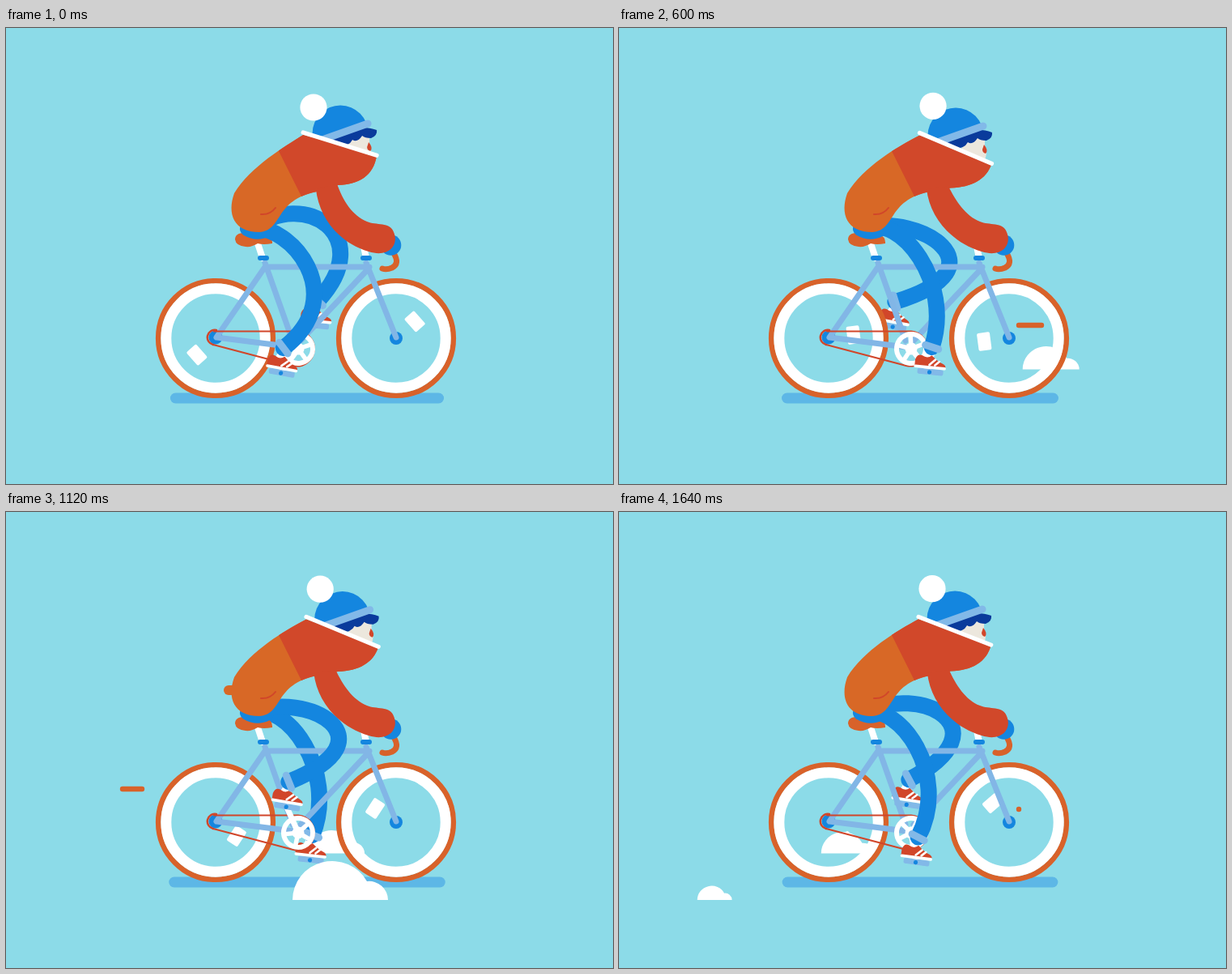
Recreate the animation shown at these times as an HTML page. Size 750 px wide and 563 px high, loop 1680 ms.

```html
<!DOCTYPE html>
<html lang="en">
<head>
<meta charset="utf-8">
<title>Winter ride</title>
<style>
html, body { margin: 0; width: 100%; height: 100%; overflow: hidden; background: #8cdbe8; }
svg { display: block; width: 100vw; height: 100vh; }
.line { fill: none; stroke-linecap: round; stroke-linejoin: round; }
</style>
</head>
<body>
<svg id="stage" viewBox="0 0 750 563" preserveAspectRatio="none">
  <defs>
    <clipPath id="chest"><path d="M322 122L372 222H490V100H322Z"/></clipPath>
    <g id="shoe">
      <rect x="-15" y="-3" width="32" height="7" rx="2" fill="#82b9e8"/>
      <circle r="2.6" cy="1" fill="#1486df"/>
      <path d="M-4 -17L1 -27" class="line" stroke="#fff" stroke-width="12"/>
      <path d="M-19 -6V-13Q-17 -21 -11 -19Q-4 -15 1 -20Q9 -13 15 -11Q20 -9 19 -6Z" fill="#d1462a"/>
      <path d="M-18 -5H18" class="line" stroke="#fff" stroke-width="3.6"/>
      <path d="M-1 -8L6 -15M6 -8L11 -13" class="line" stroke="#fff" stroke-width="2.6"/>
    </g>
    <g id="wheel">
      <circle r="70.8" fill="none" stroke="#d8622a" stroke-width="6.6"/>
      <circle r="61.2" fill="none" stroke="#fff" stroke-width="13"/>
    </g>
    <path id="cloud" d="M-59 0A49 48 0 0 1 33 -23A23.2 23.2 0 0 1 59 0Z" fill="#fff"/>
    <path id="reflector" d="M-8 -9Q-8 -11 -6 -11H6Q8 -11 8 -9V9Q8 11 6 11H-6Q-8 11 -8 9Z" fill="#fff"/>
  </defs>
  <rect width="750" height="563" fill="#8cdbe8"/>
  <path id="shadow" class="line" stroke="#5db7e6" stroke-width="13"/>
  <use id="farCloud" href="#cloud"/>
  <g id="streaks"></g>
  <g id="farLeg"></g>

  <use href="#wheel" x="259" y="383"/>
  <use href="#wheel" x="482" y="383"/>
  <use id="backRef" href="#reflector"/>
  <use id="frontRef" href="#reflector"/>

  <g class="line">
    <path d="M311 266L317 284M442 270L445 284" stroke="#fff" stroke-width="8"/>
    <circle cx="259" cy="382" r="8.5" fill="#1486df"/>
    <path d="M260 373A9 9 0 0 0 256 391" stroke="#d1462a" stroke-width="2.5"/>
    <circle cx="482" cy="383" r="8" fill="#1486df"/>
    <path d="M320 290L354 386M322 295H449M448 297L364 386M320 295L260 382L355 394M445 290L482 382" stroke="#82b6e6" stroke-width="7"/>
    <path d="M314 284H322M441 284H449" stroke="#1486df" stroke-width="6"/>
    <path d="M479 278Q487 291 477 296Q470 299 465 297" stroke="#d8622a" stroke-width="7"/>
    <path d="M257 374.5H361A21.5 21.5 0 1 1 355 417L256 391" stroke="#d1462a" stroke-width="2.2"/>
  </g>
  <g id="ring">
    <circle r="18" fill="none" stroke="#fff" stroke-width="6"/>
    <circle r="7.5" fill="#fff"/>
    <path id="spokes" stroke="#fff" stroke-width="5.5"/>
  </g>
  <path id="crank" class="line" stroke="#fff" stroke-width="7"/>
  <path d="M283 261Q283 254 292 253H318Q330 257 329 266Q318 268 311 266Q303 271 296 270Q284 269 283 261Z" fill="#d8622a"/>
  <path d="M298 248Q310 255 322 249" class="line" stroke="#1486df" stroke-width="18"/>
  <g id="nearLeg"></g>

  <g id="head">
    <path d="M422 130H449L449 142Q453 150 449 160L420 152Z" fill="#ece7dd"/>
    <path d="M448 141Q454 148 450 152Q446 151 446 147Z" fill="#d1462a"/>
    <path d="M394 142L428 124Q445 121 458 126Q459 133 451 136Q443 136 440 133Q434 142 428 138Q424 146 411 146Z" fill="#0a3b9c"/>
    <path d="M381 143A33.5 33.5 0 1 1 445 117Z" fill="#1486df"/>
    <path d="M382 141L447 118" class="line" stroke="#82b9e8" stroke-width="9"/>
  </g>
  <circle id="pom" r="16.6" fill="#fff"/>
  <path id="nub" class="line" stroke="#d86826" stroke-width="12"/>
  <path id="torso" fill="#d86826"/>
  <path id="torsoFront" fill="#d1482a" clip-path="url(#chest)"/>
  <path d="M315 230Q326 231 333 222" class="line" stroke="#d1462a" stroke-width="2"/>
  <circle cx="475.5" cy="268" r="12.8" fill="#1486df"/>
  <path id="sleeve" fill="#d1482a"/>
  <path id="collar" class="line" stroke="#fff" stroke-width="5.2"/>
  <use id="nearCloud" href="#cloud"/>
</svg>
<script>
const LOOP = 1680, STEP = 40;
const HUB = { x: 361, y: 396 }, CRANK = 36;
const HIP = { x: 305, y: 248 }, THIGH = 93;
const NS = 'http://www.w3.org/2000/svg';
const $ = id => document.getElementById(id);
const rad = deg => deg * Math.PI / 180;
const clamp = v => Math.max(0, Math.min(1, v));
const set = (el, attrs) => { for (const k in attrs) el.setAttribute(k, attrs[k]); };

function add(parent, tag, attrs) {
  const el = document.createElementNS(NS, tag);
  set(el, attrs);
  parent.appendChild(el);
  return el;
}

const line = (parent, stroke, width) =>
  add(parent, 'path', { class: 'line', stroke, 'stroke-width': width });

function makeLeg(group) {
  return {
    shoe: add(group, 'use', { href: '#shoe' }),
    limb: line(group, '#1486df', 20),
    cuff: line(group, '#82b9e8', 9)
  };
}

const near = makeLeg($('nearLeg')), far = makeLeg($('farLeg'));

// start x, end x, y, first step, colour
const streaks = [
  [192, 144, 342, 4, '#d8622a'],
  [545, 485, 405, 9, '#fff'],
  [550, 494, 367, 15, '#d8622a']
].map(([x0, x1, y, start, color]) =>
  ({ x0, x1, y, start, el: line($('streaks'), color, 6.4) }));

let spokes = '';
for (let i = 0; i < 5; i++) {
  const a = rad(72 * i);
  spokes += `M0 0L${18 * Math.cos(a)} ${18 * Math.sin(a)}`;
}
set($('spokes'), { d: spokes });

function pedalAt(deg) {
  return { x: HUB.x + CRANK * Math.cos(rad(deg)), y: HUB.y + CRANK * Math.sin(rad(deg)) };
}

// A limb of fixed length bows out from the line between hip and ankle.
function poseLeg(leg, deg) {
  const p = pedalAt(deg);
  const x = p.x + 3, y = p.y - 30;
  const dist = Math.hypot(x - HIP.x, y - HIP.y);
  const ux = (x - HIP.x) / dist, uy = (y - HIP.y) / dist;
  const bow = Math.sqrt(THIGH * THIGH - dist * dist / 4);
  const upper = bow * (1 + 0.007 * (x - 368)), lower = bow * 8 / 3 - upper;
  const at = (along, out) => [HIP.x + ux * along + uy * out, HIP.y + uy * along - ux * out];
  const [kx, ky] = at(110, lower);
  set(leg.limb, { d: `M${HIP.x} ${HIP.y}C${at(4, upper)} ${kx} ${ky} ${x} ${y}` });

  const len = Math.hypot(x - kx, y - ky);
  const nx = (y - ky) / len * 8.5, ny = (kx - x) / len * 8.5;
  set(leg.cuff, { d: `M${x - nx} ${y - ny}L${x + nx} ${y + ny}` });
  const tilt = 8 - 4 * Math.cos(rad(deg));
  set(leg.shoe, { transform: `translate(${p.x} ${p.y}) rotate(${tilt})` });
}

function poseCloud(el, t, x, y, size, born, gone) {
  const k = Math.min(clamp((t - born) / 200), clamp((gone - t) / 200));
  const s = size * (1 - Math.pow(1 - k, 2.5));
  set(el, { transform: `translate(${x} ${y}) scale(${s})` });
}

function poseBody(i) {
  const p = (1 - Math.cos(rad(30 * (i - 0.7)))) / 2;
  const lx = 367 + 4.5 * p, ly = 129 + 0.5 * p, rx = 458 + 2.5 * p, ry = 157 + 10.5 * p;
  const low = 194 + 3.5 * p;
  const d = `M${lx} ${ly + 3}C345 146 302 171 282 204C273 229 281 252 313 252` +
    `C343 250 330 213 384 202L410 ${low}C436 ${low - 1} 454 ${183 + 4 * p} ${rx} ${ry}Z`;
  set($('torso'), { d });
  set($('torsoFront'), { d });
  set($('collar'), { d: `M${lx} ${ly}L${rx} ${ry}` });
  set($('sleeve'), {
    d: `M${383 - 3 * p} 199C${387 - 3 * p} 234 411 265 448 276C473 284 486 268 479 252` +
      `C475 239 457 244 446 239C428 232 416 213 ${409 - 2 * p} ${low - 2}Z`
  });
  set($('head'), { transform: `translate(${3 * p} ${3 * p})` });
  set($('pom'), {
    cx: 383.3 + 5 * Math.cos(rad(30 * (i - 7.6))),
    cy: 98 + 3.3 * Math.cos(rad(30 * (i - 3)))
  });
  set($('shadow'), { d: `M${209.5 - 2 * p} 457H${534.5 + 2 * p}` });
}

function poseWheels(i) {
  const a = 207 + 30 * (i - 8) + 9 * Math.sin(rad(15 * (i - 5)));
  set($('frontRef'), { transform: `translate(482 383) rotate(${a}) translate(31 0)` });
  set($('backRef'), { transform: `translate(259 383) rotate(${a + 180}) translate(31 0)` });
}

function poseStreaks(k24) {
  for (const s of streaks) {
    const k = k24 - s.start;
    const at = u => s.x0 + (s.x1 - s.x0) * clamp(u / 4);
    set(s.el, {
      d: `M${at(k)} ${s.y}H${at(k - 2) + 0.01}`,
      visibility: k > 0 && k <= 6 ? 'visible' : 'hidden'
    });
  }
  const poke = Math.max(0, 1 - Math.abs(k24 - 8) / 2);
  set($('nub'), { d: `M290 220H${287 - 12 * poke}` });
}

function draw(ms) {
  const n = Math.floor((ms % LOOP) / STEP), t = n * STEP;
  // the pedalling skips ahead right after the opening pose
  const i = n ? n + 4 : 0;
  const turn = 246 + 15 * (i - 8);
  const p = pedalAt(turn);
  poseLeg(near, turn);
  poseLeg(far, turn + 180);
  set($('ring'), { transform: `translate(${HUB.x} ${HUB.y}) rotate(${turn})` });
  set($('crank'), { d: `M${HUB.x} ${HUB.y}L${p.x} ${p.y}` });
  poseBody(i);
  poseWheels(i);
  poseStreaks(i % 24);
  poseCloud($('farCloud'), t, 350 - 0.2417 * (t - 1360), 421.5, 0.593, 72, 1771);
  poseCloud($('nearCloud'), t, 413 - 0.567 * (t - 1120), 479, 1, 650, 1673);
}

const began = performance.now();
function tick() {
  draw(performance.now() - began);
  requestAnimationFrame(tick);
}
tick();
</script>
</body>
</html>
```
